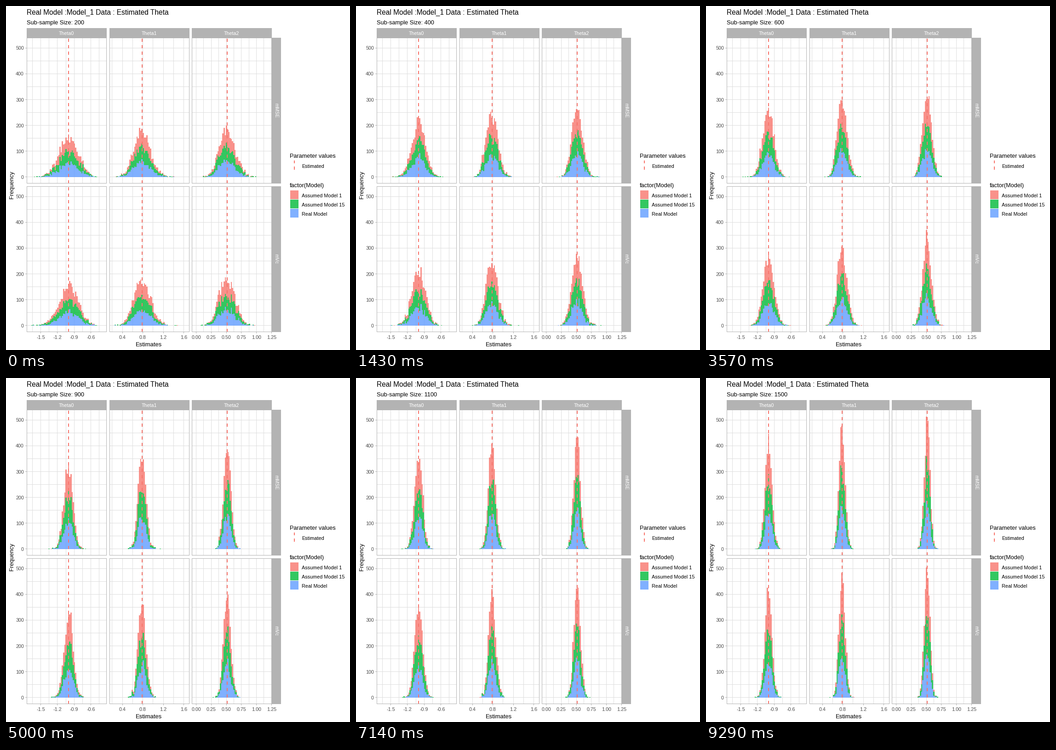
A matplotlib script for the animation above (10 s loop, 748 px wide and 748 px high).

```python
import numpy as np
import matplotlib.pyplot as plt
from matplotlib.animation import FuncAnimation
from matplotlib.patches import Polygon, Rectangle

SIZE = 748
LOOP = 10000
STEPS = 14
PX = 0.72  # points per pixel at 100 dpi

RED, GREEN, BLUE = "#F8766D", "#00BA38", "#619CFF"
GRID, FRAME, TICK = "#DEDEDE", "#B3B3B3", "#4D4D4D"
ALPHA = 0.8

PANEL_W, PANEL_H = 174, 317
BIN = 2.64
UNIT = 0.561  # pixels per count
SAMPLES = 1000

# left edge, pixel of value 0, pixels per unit, first tick, step, ticks, format,
# dashed line, spread at n = 1, skew
COLS = [
    (45, 257.4, 121.3, -1.5, 0.3, 4, "%.1f", 135, 296, -0.015),
    (225, 208.6, 111.2, 0.4, 0.4, 4, "%.1f", 295, 259, 0.03),
    (404, 413.6, 131.0, 0.0, 0.25, 6, "%.2f", 480, 240, 0.02),
]
ROWS = [(69, "mMSE"), (392, "mVc")]

rng = np.random.default_rng(12)

plt.rcParams["font.family"] = "Liberation Sans"
fig = plt.figure(figsize=(SIZE / 100, SIZE / 100), dpi=100, facecolor="white")
ax = fig.add_axes([0, 0, 1, 1])
ax.set_xlim(0, SIZE)
ax.set_ylim(SIZE, 0)
ax.axis("off")


def box(x, y, w, h, color, z=1, alpha=1):
    ax.add_patch(Rectangle((x, y), w, h, fc=color, lw=0, alpha=alpha,
                           zorder=z, antialiased=False))


def label(x, y, text, size, color="black", ha="left", **kw):
    kw.setdefault("va", "baseline")
    return ax.text(x, y, text, fontsize=size * PX, color=color, ha=ha,
                   zorder=6, **kw)


def dashes(x, top, bottom, z):
    for y in range(bottom, top, -14):
        start = max(top, y - 7)
        box(x, start, 2, y - start, RED, z)


def outline(x, y, w, h):
    box(x, y, w, 1, FRAME, 4)
    box(x, y + h - 1, w, 1, FRAME, 4)
    box(x, y, 1, h, FRAME, 4)
    box(x + w - 1, y, 1, h, FRAME, 4)


def zero_line(top):
    return top + 302.5


def draw_panel(col, top):
    left, origin, scale, first, step, count, _, dash, _, _ = col
    for i in range(-1, 2 * count + 1):
        x = int(origin + scale * (first + i * step / 2))
        if left < x < left + PANEL_W - 1:
            box(x, top, 1, PANEL_H, GRID)
    for value in range(0, 501, 50):
        box(left, int(zero_line(top) - UNIT * value), PANEL_W, 1, GRID)
    dashes(dash, top, top + PANEL_H, 3)
    outline(left, top, PANEL_W, PANEL_H)


def draw_static():
    label(45, 19, "Real Model :Model_1 Data : Estimated Theta", 15.5)
    label(311, 740, "Estimates", 13, ha="center")
    label(13, 389, "Frequency", 12.8, ha="center", va="center", rotation=90)

    for i, col in enumerate(COLS):
        left, origin, scale, first, step, count, fmt = col[:7]
        box(left, 48, PANEL_W, 21, FRAME)
        label(left + 86.5, 63, "Theta%d" % i, 10.6, "white", "center")
        for top, _ in ROWS:
            draw_panel(col, top)
        for k in range(count):
            value = first + k * step
            x = origin + scale * value
            box(int(x), 709, 1, 3, FRAME)
            label(x, 724, fmt % value, 10.7, TICK, "center")

    for top, name in ROWS:
        box(577, top, 21, PANEL_H, FRAME)
        label(587, top + 158, name, 10.6, "white", "center", va="center",
              rotation=270)
        for value in range(0, 501, 100):
            y = zero_line(top) - UNIT * value
            box(42, int(y), 3, 1, FRAME)
            label(39, y + 4.3, str(value), 10.7, TICK, "right")

    label(617, 330, "Parameter values", 12.7)
    dashes(626, 336, 356, 3)
    label(643, 352, "Estimated", 10.9)
    label(617, 394, "factor(Model)", 12.7)
    keys = [("Assumed Model 1", RED), ("Assumed Model 15", GREEN),
            ("Real Model", BLUE)]
    for i, (name, color) in enumerate(keys):
        box(618, 401 + 20 * i, 18, 19, color, alpha=ALPHA)
        label(643, 416 + 20 * i, name, 10.9)


def make_layers():
    layers = []
    for color in (BLUE, GREEN, RED):
        patch = Polygon([(0, 0), (0, 0), (0, 0)], fc=color, lw=0,
                        alpha=ALPHA, zorder=2, antialiased=False)
        layers.append(ax.add_patch(patch))
    return layers


def bin_edges(col):
    left, origin = col[:2]
    k = np.ceil((left + 6 - origin) / BIN)
    return origin + (k - 0.5 + np.arange(62)) * BIN


def stacked_counts(n, col):
    spread = col[8] / np.sqrt(n)
    skew = col[9] * np.sqrt(200 / n)
    counts = []
    for widen in (0.98, 1.06, 0.97):
        z = rng.standard_normal(SAMPLES) * widen
        x = col[7] + 1 + spread * (z + skew * (z * z - 1))
        counts.append(np.histogram(x, bin_edges(col))[0])
    return np.cumsum(counts, axis=0)


def step_shape(xs, low, high):
    x = np.repeat(xs, 2)[1:-1]
    upper = np.column_stack([x, np.repeat(high, 2)])
    lower = np.column_stack([x, np.repeat(low, 2)])
    return np.vstack([upper, lower[::-1]])


sizes = [200 + 100 * i for i in range(STEPS)]
cells = [(r, c) for r in range(2) for c in range(3)]
totals = [{(r, c): stacked_counts(n, COLS[c]) for r, c in cells}
          for n in sizes]

draw_static()
subtitle = label(45, 40, "", 12.8)
panels = {cell: make_layers() for cell in cells}


def update(i):
    subtitle.set_text("Sub-sample Size: %d" % sizes[i])
    for (r, c), layers in panels.items():
        xs = np.round(bin_edges(COLS[c]))
        base = zero_line(ROWS[r][0])
        low = np.full(len(xs) - 1, np.floor(base + 0.5))
        for patch, total in zip(layers, totals[i][r, c]):
            high = np.floor(base - UNIT * total + 0.5)
            patch.set_xy(step_shape(xs, low, high))
            low = high
    return [subtitle]


anim = FuncAnimation(fig, update, frames=STEPS, interval=LOOP / STEPS,
                     init_func=lambda: update(0), repeat=True,
                     repeat_delay=0, blit=False)
plt.show()
```
